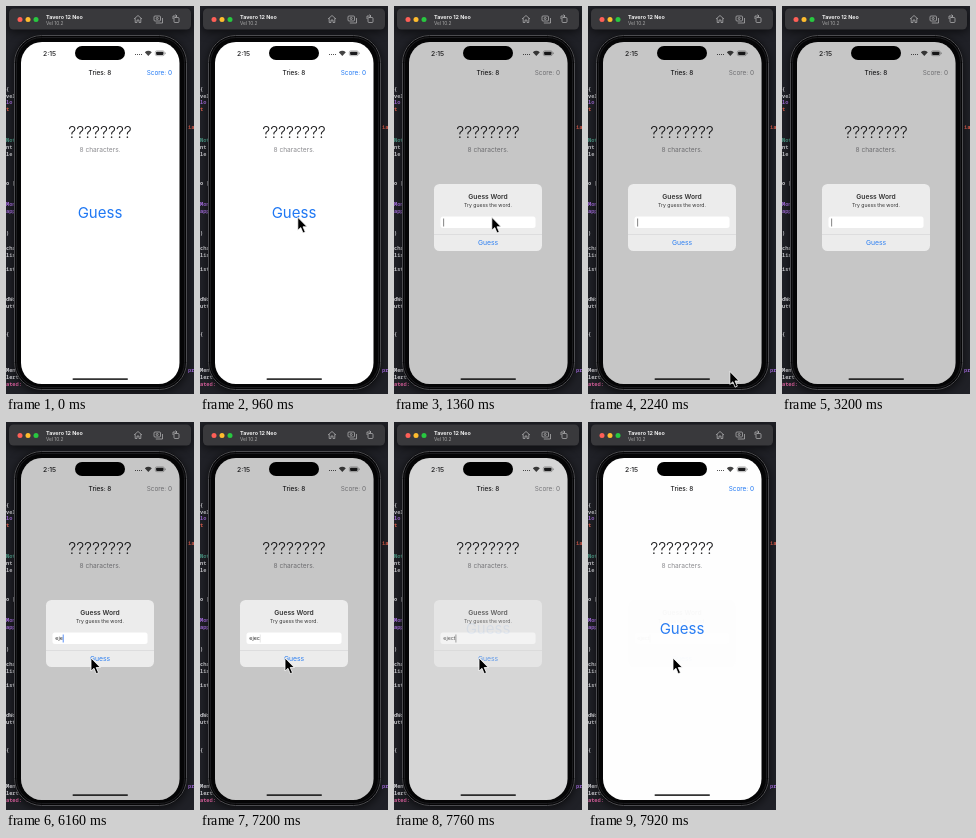
These frames come from a looping animation (188x388 px, 8000 ms). An HTML page:

```html
<!DOCTYPE html>
<html lang="en">
<head>
<meta charset="utf-8">
<style>
html, body { margin: 0; width: 100%; height: 100%; overflow: hidden; background: #202127; }
svg { display: block; width: 188px; height: 388px; font-family: Inter, sans-serif; }
.mid { text-anchor: middle; }
.bold { font-weight: 600; }
.code { font: 600 5.3px "Noto Sans Mono", monospace; white-space: pre; }
.line { fill: none; stroke: #b9b9bb; stroke-width: .7; }
.shade { filter: drop-shadow(0 2px 5px #000a); }
</style>
</head>
<body>
<svg viewBox="0 0 188 388">
  <rect width="188" height="388" fill="#202127"/>
  <g id="code" class="code"></g>

  <rect x="8" y="29" width="173" height="355" rx="27" class="shade"/>
  <rect x="3" y="2.500" width="182" height="21" rx="4.500" fill="#39393c" class="shade"/>
  <circle cx="14" cy="13.500" r="2.500" fill="#fe5f57"/>
  <circle cx="22" cy="13.500" r="2.500" fill="#febc2e"/>
  <circle cx="30" cy="13.500" r="2.500" fill="#28c840"/>
  <text x="40" y="12.500" font-size="5.400" font-weight="700" fill="#eee">Tavero 12 Neo</text>
  <text x="40" y="18.500" font-size="4.800" fill="#aaa">Vel 10.2</text>
  <g class="line">
    <path d="M128 13L132 9.500L136 13M129.200 12.200V16.500H131V14H133V16.500H134.800V12.200"/>
    <rect x="148" y="10" width="6.500" height="5" rx="1"/>
    <path d="M149.800 17H156.500V12"/>
    <circle cx="151.200" cy="12.500" r="1"/>
    <rect x="168" y="11.500" width="5" height="5" rx="1"/>
    <path d="M167 13V10H171M169.500 8.500L171 10L169.500 11.500"/>
  </g>

  <rect x="8.500" y="29.500" width="172" height="354" rx="27" fill="#050506" stroke="#4c4c50"/>
  <rect x="10.500" y="31.500" width="168" height="350" rx="25" fill="none" stroke="#1c1c1f"/>
  <clipPath id="glass"><rect x="15" y="36" width="158.500" height="342" rx="21"/></clipPath>
  <g clip-path="url(#glass)" fill="#1c1c1e">
    <rect x="15" y="36" width="159" height="342" fill="#fff"/>
    <text x="37" y="50" font-size="6.800" font-weight="500">2:15</text>
    <circle cx="129.500" cy="48.500" r=".5"/><circle cx="131.500" cy="48.500" r=".5"/>
    <circle cx="133.500" cy="48.500" r=".5"/><circle cx="135.500" cy="48.500" r=".5"/>
    <path d="M138.800 46.200Q142.300 43.400 145.800 46.200L142.300 50Z" fill="#444"/>
    <rect x="149.300" y="44.900" width="9" height="4.800" rx="1.500" fill="none" stroke="#888" stroke-width=".6"/>
    <rect x="150.100" y="45.700" width="7.400" height="3.200" rx=".9"/>
    <rect x="158.900" y="46.500" width=".7" height="1.600" fill="#888"/>
    <text x="94" y="69" font-size="6.400" font-weight="500" class="mid">Tries: 8</text>
    <text id="score" x="166" y="69" font-size="6.400" text-anchor="end">Score: 0</text>
    <text x="94" y="132" font-size="15.900" font-weight="300" class="mid">????????</text>
    <text x="94" y="145.500" font-size="6.600" class="mid" fill="#8b8b8f">8 characters.</text>
    <text id="big" x="94" y="212.300" font-size="15" class="mid" fill="#1f78f4">Guess</text>
    <rect x="66.500" y="372.200" width="55.500" height="1.700" rx=".85" fill="#333"/>
    <rect id="dim" x="15" y="36" width="159" height="342" fill="#000"/>

    <g id="alert">
      <rect x="40" y="178" width="108" height="67" rx="5.500" fill="#ececec"/>
      <text x="94" y="192.700" font-size="6.700" class="mid bold" fill="#333">Guess Word</text>
      <text x="94" y="200.700" font-size="5.100" class="mid" fill="#333">Try guess the word.</text>
      <rect x="46.500" y="210.500" width="95" height="11.500" rx="2.500" fill="#fff"/>
      <text id="word" x="49.300" y="218.300" font-size="5.300" fill="#222"></text>
      <rect id="caret" y="212.500" width=".8" height="8"/>
      <rect x="40" y="228.500" width="108" height=".5" fill="#cdcdcf"/>
      <path id="press" d="M40 229H148V239.500Q148 245 142.500 245H45.500Q40 245 40 239.500Z" fill="#bbb"/>
      <text x="94" y="239.300" font-size="6.800" class="mid" fill="#2f80f2">Guess</text>
    </g>
  </g>
  <rect x="69" y="40" width="50" height="14" rx="7"/>
  <path id="cursor" d="M0 0V13L3 10.300L5.200 15.700L7.500 14.700L5.200 9.500H9.300Z" stroke="#fff" stroke-width=".8"/>
</svg>
<script>
const $ = id => document.getElementById(id);
const clamp = v => Math.min(1, Math.max(0, v));
const ease = (t, from, to) => { const u = clamp((t - from) / (to - from)); return u * u * (3 - 2 * u); };

// Visible ends of the editor's lines: x, y, text, colour
const white = '#d0d0d5', pink = '#d85f9c', violet = '#a56ddd', teal = '#4fa08c', red = '#e0604f';
const lines = [
  [0, 85, ' {', white], [0, 92, 'vel', white], [0, 98, 'lo', violet], [0, 105, ' t', red],
  [0, 136, 'Not', teal], [0, 143, 'nt ', white], [0, 150, 'le', white], [0, 179, 'o [', white],
  [0, 200, 'Mont', violet], [0, 207, 'app', violet], [0, 229, ')', white], [0, 244, 'char', white],
  [0, 251, 'list', white], [0, 265, 'ist', white], [0, 295, 'dWo', white], [0, 302, 'utt', white],
  [0, 330, '{', white], [0, 366, 'Ment', white], [0, 373, 'lerta', white], [0, 380, 'ated: t', pink],
  [182, 123, 'ia', red], [182, 366, 'pr', violet]
];
$('code').innerHTML = lines.map(([x, y, s, c]) => `<text x="${x}" y="${y}" fill="${c}">${s}</text>`).join('');

// Pointer stops: time, x, y
const stops = [
  [0, 132, 392], [160, 132, 392], [800, 97.8, 211.3], [1760, 97.8, 211.3], [2400, 150, 394],
  [3600, 150, 394], [4400, 85, 236], [8000, 85, 236]
];
const keys = [[5600, 'e'], [5840, 'j'], [6080, 'e'], [6800, 'c'], [7440, 't']];

function pointer(t) {
  const i = stops.findIndex(s => s[0] > t);
  const [t0, x0, y0] = stops[i - 1], [t1, x1, y1] = stops[i];
  const u = ease(t, t0, t1);
  return [x0 + (x1 - x0) * u, y0 + (y1 - y0) * u];
}

function draw(t) {
  const show = ease(t, 960, 1240), hide = ease(t, 7660, 7945), on = show * (1 - hide);
  const zoom = 1.15 - .15 * show;
  $('alert').setAttribute('opacity', on);
  $('alert').setAttribute('transform', `translate(94 211.500) scale(${zoom}) translate(-94 -211.500)`);
  $('dim').setAttribute('opacity', .225 * on);
  $('score').setAttribute('fill', on > .4 ? '#8b8b8f' : '#1f78f4');
  $('big').setAttribute('opacity', t >= 880 && t < 960 ? .3 : 1 - on);
  $('press').setAttribute('opacity', t >= 7600 && t < 7760 ? 1 : 0);

  const typed = keys.filter(k => k[0] <= t);
  $('word').textContent = typed.map(k => k[1]).join('');
  const width = typed.length ? $('word').getComputedTextLength() : 0;
  const recent = typed.length && t - typed[typed.length - 1][0] < 300;
  $('caret').setAttribute('x', 49.3 + width);
  $('caret').setAttribute('fill', recent ? '#3478f6' : '#666');
  $('caret').setAttribute('opacity', recent ? 1 : clamp(.55 + .6 * Math.cos((t - 1360) / 920 * 2 * Math.PI)));
  $('cursor').setAttribute('transform', `translate(${pointer(t)})`);
}

function tick() {
  draw(Math.floor(performance.now() % 8000 / 80) * 80);
  requestAnimationFrame(tick);
}
tick();
</script>
</body>
</html>
```
